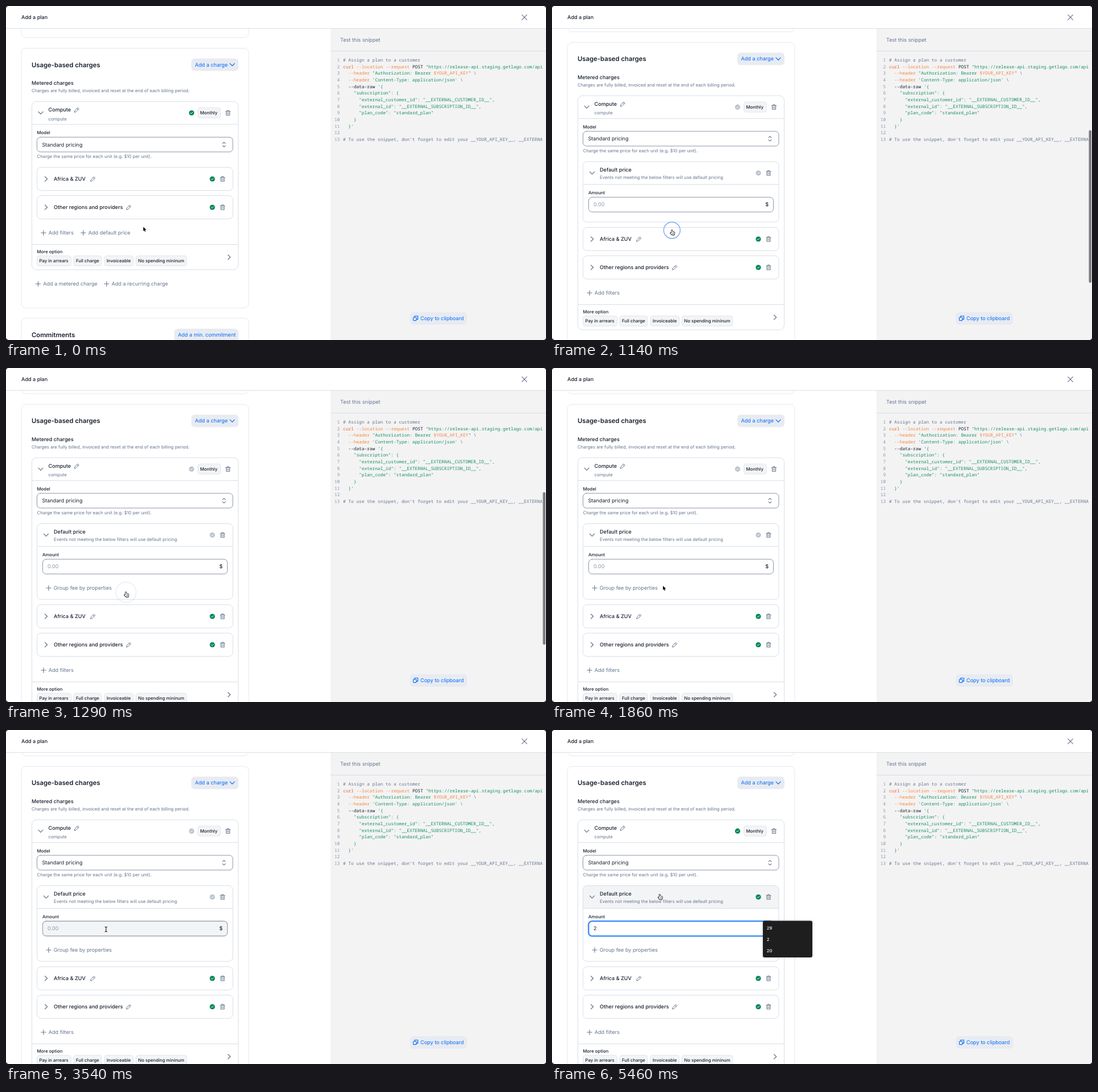
These frames come from a looping animation (950 by 589 pixels, 5.49 s). An HTML page with a canvas:

```html
<!DOCTYPE html>
<html lang="en">
<head>
<meta charset="utf-8">
<title>Add a plan</title>
<style>
  html, body { margin: 0; width: 100%; height: 100%; overflow: hidden; background: #fff; }
  canvas { display: block; width: 950px; height: 589px; }
</style>
</head>
<body>
<canvas id="stage"></canvas>
<script>
const W = 950, H = 589, LOOP = 5490;
const canvas = document.getElementById('stage');
const c = canvas.getContext('2d');
const dpr = window.devicePixelRatio || 1;
canvas.width = W * dpr;
canvas.height = H * dpr;

const INK = '#19212e', GREY = '#66758f', MUTED = '#8c95a6', LINE = '#d9dee7',
      BLUE = '#006cfa', GREEN = '#008559', SOFT = '#f3f4f6', BUTTON = '#e8ebf1',
      ORANGE = '#f5873a', STRING = '#17905f';
const BIG = 11.3, MID = 9.1, SMALL = 7.8;

const clamp = v => Math.max(0, Math.min(1, v));
const ramp = (t, from, length) => clamp((t - from) / length);
const smooth = v => v * v * (3 - 2 * v);
const mix = (a, b, k) => a + (b - a) * k;

function text(str, x, mid, size = MID, color = INK, weight = 400, family = 'Inter, sans-serif') {
  c.font = `${weight} ${size}px ${family}`;
  c.fillStyle = color;
  c.fillText(str, x, mid + size * 0.36);
}

function box(x, y, w, h, r, fill, stroke, width = 1) {
  c.beginPath();
  c.roundRect(x, y, w, h, r);
  if (fill) { c.fillStyle = fill; c.fill(); }
  if (stroke) { c.strokeStyle = stroke; c.lineWidth = width; c.stroke(); }
}

function path(points, color = GREY, width = 1.1) {
  c.beginPath();
  points.forEach(([x, y], i) => i ? c.lineTo(x, y) : c.moveTo(x, y));
  c.strokeStyle = color;
  c.lineWidth = width;
  c.stroke();
}

function at(x, y, draw) {
  c.save();
  c.translate(x, y);
  draw();
  c.restore();
}

const rule = (x, y, w) => path([[x, y], [x + w, y]], LINE, 1);
const chevronDown = (x, y, color) => at(x, y, () => path([[-4, -2], [0, 2.2], [4, -2]], color, 1.2));
const chevronRight = (x, y) => at(x, y, () => path([[-2, -4], [2.2, 0], [-2, 4]], GREY, 1.2));

function plus(x, y) {
  path([[x - 4.2, y], [x + 4.2, y]]);
  path([[x, y - 4.2], [x, y + 4.2]]);
}

function check(x, y, on) {
  c.beginPath();
  c.arc(x, y, 4.6, 0, 7);
  c.fillStyle = on ? GREEN : '#bcc3d0';
  c.fill();
  at(x, y, () => path([[-2, 0.1], [-0.6, 1.5], [2, -1.3]], '#fff', 1));
}

function pencil(x, y) {
  at(x, y, () => {
    path([[-4, 4], [-3.6, 1.4], [1.7, -3.8], [3.8, -1.7], [-1.5, 3.6], [-4, 4]], GREY, 1);
    path([[0.3, -2.4], [2.4, -0.3]], GREY, 1);
  });
}

function trash(x, y) {
  at(x, y, () => {
    path([[-4, -2.7], [4, -2.7]], GREY, 1);
    path([[-1.6, -2.8], [-1.6, -4.3], [1.6, -4.3], [1.6, -2.8]], GREY, 1);
    path([[-3.1, -2.5], [-3.1, 4.2], [3.1, 4.2], [3.1, -2.5]], GREY, 1);
    path([[-1.1, -0.8], [-1.1, 2.4]], GREY, 0.9);
    path([[1.1, -0.8], [1.1, 2.4]], GREY, 0.9);
  });
}

function chip(label, x, y, w) {
  box(x + 0.5, y + 0.5, w - 1, 18, 4, SOFT, '#e3e6ec');
  text(label, x + 4.5, y + 9.5, SMALL, INK, 500);
}

function addLink(label, x, y) {
  plus(x, y);
  text(label, x + 8.7, y, MID, GREY);
}

function filterRow(label, y, penX) {
  box(54.5, y - 20.5, 344.5, 41, 7, '#fff', LINE);
  chevronRight(70.5, y);
  text(label, 84, y, MID, INK, 500);
  pencil(penX, y);
  check(363, y, true);
  trash(381, y);
}

// Code panel: each line is [text, colour, text, colour, ...]
const CODE = [
  ['# Assign a plan to a customer', GREY],
  ['curl', '#f0642a', ' --location --request', ORANGE, ' POST ', INK,
    '"https://release-api.staging.getlago.com/api', STRING],
  ['  --header', ORANGE, ' "Authorization: Bearer ', STRING, '$YOUR_API_KEY', ORANGE, '"', STRING, ' \\', GREY],
  ['  --header', ORANGE, " 'Content-Type: application/json'", STRING, ' \\', GREY],
  ['  --data-raw ', INK, "'{", STRING],
  ['    "subscription": {', STRING],
  ['      "external_customer_id": "__EXTERNAL_CUSTOMER_ID__",', STRING],
  ['      "external_id": "__EXTERNAL_SUBSCRIPTION_ID__",', STRING],
  ['      "plan_code": "standard_plan"', STRING],
  ['    }', STRING],
  ["  }'", STRING],
  [],
  ['# To use the snippet, don’t forget to edit your __YOUR_API_KEY__, __EXTERNA', GREY]
];
const MONO = '"Noto Sans Mono", monospace', CELL = 4.69;

function snippet() {
  c.fillStyle = '#f3f3f4';
  c.fillRect(571, 40, 379, 549);
  text('Test this snippet', 588, 60, MID, GREY);
  rule(571, 79.5, 379);
  c.save();
  c.beginPath();
  c.rect(571, 80, 373, 400);
  c.clip();
  CODE.forEach((line, i) => {
    const y = 95.3 + i * 11.67, n = String(i + 1);
    text(n, 587.2 - n.length * CELL, y, CELL / 0.6, MUTED, 400, MONO);
    let col = 0;
    for (let k = 0; k < line.length; k += 2) {
      text(line[k], 593 + col * CELL, y, CELL / 0.6, line[k + 1], 400, MONO);
      col += line[k].length;
    }
  });
  c.restore();
  box(710.5, 540, 100.5, 22, 6, BUTTON);
  box(716.5, 549, 5.6, 5.6, 1, null, BLUE, 1.1);
  path([[718.8, 549], [718.8, 546.8], [724.6, 546.8], [724.6, 552.4], [722, 552.4]], BLUE, 1.1);
  text('Copy to clipboard', 729, 551, MID, BLUE);
}

function header() {
  c.fillStyle = '#fff';
  c.fillRect(0, 0, W, 40);
  rule(0, 39.5, W);
  text('Add a plan', 27, 20, MID, INK, 500);
  path([[907.7, 15.7], [916.3, 24.3]], GREY, 1.2);
  path([[907.7, 24.3], [916.3, 15.7]], GREY, 1.2);
}

function defaultPrice(s) {
  box(54.5, 274.5, 344.5, s.grouped ? 133.5 : 106.5, 7, '#fff');
  if (s.headHover) {
    c.globalAlpha = s.headHover;
    box(54.5, 274.5, 344.5, 40.5, [7, 7, 0, 0], SOFT);
    c.globalAlpha = 1;
  }
  box(54.5, 274.5, 344.5, s.grouped ? 133.5 : 106.5, 7, null, LINE);
  chevronDown(70.5, 294.5);
  text('Default price', 84, 289, MID, INK, 500);
  text('Events not meeting the below filters will use default pricing', 84, 302, SMALL, GREY);
  check(363, 294.5, s.typed);
  trash(381, 294.5);
  rule(55, 314.5, 344);
  text('Amount', 64, 329, SMALL, INK, 500);
  if (s.focused) box(64, 337, 326, 26.5, 6, '#fff', '#b9d6fd', 3.2);
  box(64.5, 337.2, 325, 26, 6, '#fff', s.focused ? BLUE : MUTED, s.focused ? 1.5 : 1);
  if (s.fieldHover && !s.focused) {
    c.globalAlpha = s.fieldHover;
    box(64.5, 337.2, 325, 26, 6, SOFT, MUTED);
    c.globalAlpha = 1;
  }
  text(s.typed ? '2' : '0.00', 73, 350.2, MID, s.typed ? INK : MUTED);
  text('$', 375.2, 350.2, MID, INK, 500);
  if (s.caret) path([[s.typed ? 79.2 : 73, 345], [s.typed ? 79.2 : 73, 355.5]], INK, 0.8);
  if (s.grouped) addLink('Group fee by properties', 75, 388);
}

function form(s) {
  const grow = s.open ? (s.grouped ? 143.3 : 116.3) : 0;
  c.save();
  c.translate(0, s.open ? -10.3 : 0);
  box(27, 0, 400, 55.7, 8, '#fff', '#e4e8ee');
  box(27, 74.5, 400, 458 + grow, 8, '#fff', '#e4e8ee');
  text('Usage-based charges', 45, 103.5, BIG, INK, 600);
  box(326, 92.5, 83, 22, 6, BUTTON);
  text('Add a charge', 332.5, 103.5, MID, BLUE);
  chevronDown(398, 103.5, BLUE);
  text('Metered charges', 45, 135.7, MID, INK, 500);
  text('Charges are fully billed, invoiced and reset at the end of each billing period.', 45, 149.3, SMALL, GREY);

  box(45.5, 168.5, 363, 296.5 + grow, 8, '#fff', LINE);
  chevronDown(61, 188.5);
  text('Compute', 74.5, 183.2, MID, INK, 500);
  pencil(124.5, 183.2);
  text('compute', 74.5, 198.7, SMALL, GREY);
  check(326.5, 188.5, !s.open || s.typed);
  chip('Monthly', 337, 179, 41);
  trash(390.5, 188.5);
  rule(46, 208.7, 362);
  text('Model', 54.5, 223.3, SMALL, INK, 500);
  box(54.5, 231.3, 344.5, 26, 6, '#fff', MUTED);
  text('Standard pricing', 63.5, 244.3, MID, INK);
  at(383.5, 244.3, () => {
    path([[-2.5, -1.8], [0, -4.2], [2.5, -1.8]]);
    path([[-2.5, 1.8], [0, 4.2], [2.5, 1.8]]);
  });
  text('Charge the same price for each unit (e.g. $10 per unit).', 54.5, 265.5, SMALL, GREY);

  c.translate(0, grow);
  filterRow('Africa & ZUV', 305, 153);
  filterRow('Other regions and providers', 355, 216);
  addLink('Add filters', 66, 400);
  if (!s.open) {
    c.globalAlpha = s.linkHover;
    box(125, 389, 98.5, 22, 6, '#e4e7ed');
    c.globalAlpha = 1;
    addLink('Add default price', 136, 400);
  }
  rule(46, 420.5, 362);
  text('More option', 54.5, 433, SMALL, INK, 500);
  chip('Pay in arrears', 54, 440, 61);
  chip('Full charge', 118.5, 440, 50);
  chip('Invoiceable', 172.5, 440, 52);
  chip('No spending mininum', 228, 440, 90.5);
  chevronRight(392.5, 443);
  addLink('Add a metered charge', 56.5, 490);
  addLink('Add a recurring charge', 177, 490);

  box(27, 550.5, 400, 90, 8, '#fff', '#e4e8ee');
  text('Commitments', 45, 580, BIG, INK, 600);
  box(296, 569, 113, 22, 6, BUTTON);
  text('Add a min. commitment', 302.5, 580, MID, BLUE);
  c.restore();

  if (s.open) defaultPrice(s);
}

function suggestions(items) {
  c.save();
  c.shadowColor = 'rgba(0,0,0,.25)';
  c.shadowBlur = 4;
  box(371, 336.5, 87, items.length * 20 + 4.5, 3, '#1e1e1e');
  c.restore();
  items.forEach((item, i) => text(item, 377.8, 349.2 + i * 20, 7.6, '#fff', 500));
}

function ring(x, y, k, color) {
  if (k <= 0 || k >= 1) return;
  c.globalAlpha = Math.min(1, 2.4 * (1 - k));
  c.beginPath();
  c.arc(x, y, mix(6, 18, 1 - (1 - k) ** 2), 0, 7);
  c.strokeStyle = color;
  c.lineWidth = 1.2;
  c.stroke();
  c.globalAlpha = 1;
}

function shape(points, fill, stroke, width) {
  c.beginPath();
  points.forEach(([x, y], i) => i ? c.lineTo(x, y) : c.moveTo(x, y));
  c.closePath();
  c.lineJoin = 'round';
  c.strokeStyle = stroke;
  c.lineWidth = width;
  c.stroke();
  c.fillStyle = fill;
  c.fill();
}

const ARROW = [[0, 0], [0, 7.4], [1.7, 5.9], [2.8, 8.5], [4.1, 7.9], [3, 5.4], [5.2, 5.2]];
const HAND = [[-0.7, 0.2], [0.6, 0.2], [0.8, 3], [4.2, 3.8], [4.7, 4.8], [4, 8.6],
              [0.2, 8.6], [-2.8, 5.6], [-2.2, 4.7], [-0.7, 5.4]];

function pointer(x, y, kind) {
  at(x, y, () => {
    if (kind === 'arrow') shape(ARROW, '#000', '#fff', 1.4);
    else if (kind === 'hand') {
      shape(HAND, '#fff', '#111', 1.6);
      path([[1.4, 5], [1.4, 7]], '#111', 0.6);
      path([[2.8, 5], [2.8, 7]], '#111', 0.6);
    } else {
      path([[0, -3.6], [0, 3.6]], '#111', 1.1);
      path([[-1.9, -4.3], [0, -3.6], [1.9, -4.3]], '#111', 1);
      path([[-1.9, 4.3], [0, 3.6], [1.9, 4.3]], '#111', 1);
    }
  });
}

function cursorAt(t) {
  if (t < 1710) {
    const k = 1 - (1 - ramp(t, 0, 240)) ** 2;
    return [mix(241.8, 211, k), mix(389.5, 395, k), k > 0.6 ? 'hand' : 'arrow'];
  }
  if (t < 5070) {
    const k = smooth(ramp(t, 1710, 420)), a = (1 - k) ** 2, b = 2 * k * (1 - k), d = k * k;
    const y = 395 * a + 378 * b + 351.5 * d;
    return [210 * a + 181.6 * b + 176 * d, y, y < 363 ? 'beam' : k > 0 ? 'arrow' : 'hand'];
  }
  const k = smooth(ramp(t, 5070, 390)), y = mix(351.5, 290, k);
  return [mix(176, 189.5, k), y, y < 315 ? 'hand' : y < 337 ? 'arrow' : 'beam'];
}

function draw(t) {
  const s = {
    open: t >= 1110,
    grouped: t >= 1260,
    linkHover: ramp(t, 90, 150),
    fieldHover: ramp(t, 1980, 150),
    focused: t >= 4020,
    typed: t >= 4590,
    caret: (t >= 4020 && t < 4470) || (t >= 4590 && t < 5090),
    headHover: ramp(t, 5290, 150)
  };
  c.setTransform(dpr, 0, 0, dpr, 0, 0);
  c.textRendering = 'geometricPrecision';
  c.lineCap = 'round';
  c.lineJoin = 'round';
  c.fillStyle = '#1b1f27';
  c.fillRect(0, 0, W, H);
  c.save();
  c.beginPath();
  c.roundRect(0, 0, W, H, 5);
  c.clip();
  c.fillStyle = '#fff';
  c.fillRect(0, 0, W, H);
  form(s);
  snippet();
  header();
  if (s.open && t < 1860) {
    c.globalAlpha = 1 - ramp(t, 1710, 150);
    box(944.5, 219, 4.5, 269, 2.2, '#7d7d7f');
    c.globalAlpha = 1;
  }
  if (t >= 4140) suggestions(s.typed ? ['29', '2', '20'] : ['1', '29', '10', '2', '0', '100']);
  ring(211, 395.5, ramp(t, 990, 330), '#6d9df0');
  ring(176, 352, ramp(t, 3960, 330), '#b4b8c0');
  pointer(...cursorAt(t));
  c.restore();
}

const start = performance.now();
function tick() {
  draw((performance.now() - start) % LOOP);
  requestAnimationFrame(tick);
}
tick();
</script>
</body>
</html>
```
